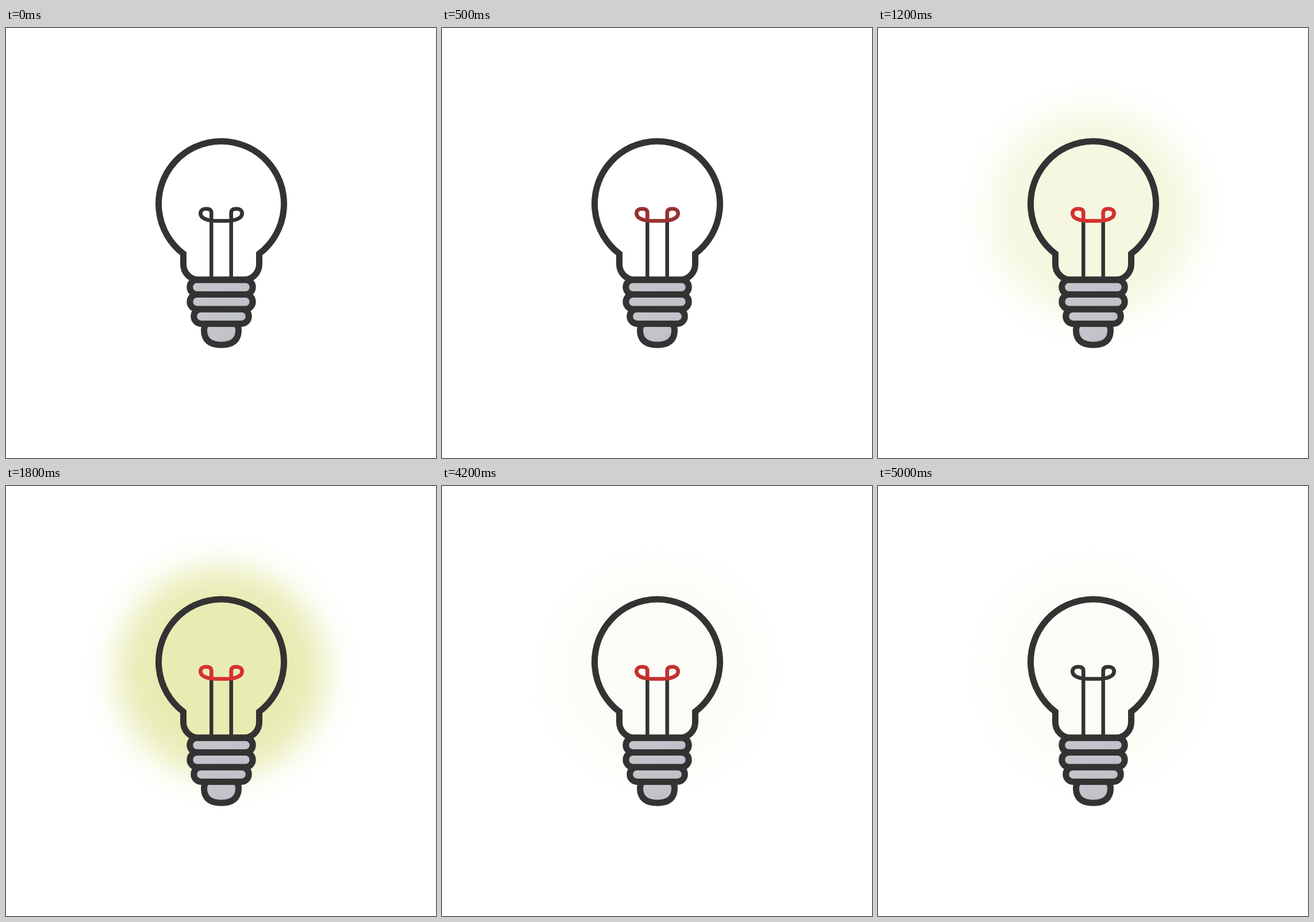
An HTML page for the animation above (5.1 s loop, 748 px wide and 748 px high).

```html
<!DOCTYPE html>
<html lang="en">
<head>
<meta charset="utf-8">
<title>Light bulb</title>
<style>
  html, body { margin: 0; width: 100%; height: 100%; overflow: hidden; background: #fff; }
  svg { display: block; width: 100vw; height: 100vh; }
</style>
</head>
<body>
<svg viewBox="0 0 748 748" fill="none" stroke="#333" stroke-width="11">
  <defs>
    <filter id="blur" x="-50%" y="-50%" width="200%" height="200%" color-interpolation-filters="sRGB">
      <feGaussianBlur stdDeviation="28"/>
    </filter>
    <linearGradient id="metal" x1="0" y1="0" x2="1" y2="1">
      <stop offset="0" stop-color="#c7c8cd"/>
      <stop offset="1" stop-color="#bdbfc7"/>
    </linearGradient>
  </defs>
  <g id="glow" opacity="0">
    <circle cx="374.5" cy="323" r="182" fill="#e8ecb3" stroke="none" filter="url(#blur)"/>
  </g>
  <path d="M357.3 335V438M391.7 335V438" stroke-width="6.5"/>
  <path id="filament" stroke-width="6.7" d="M357.3 337V321Q357 314.5 348 314.5C342 314.5 338.3 318 338.3 322.5
    C338.3 330 348 335.5 366 335.5H383C401 335.5 410.7 330 410.7 322.5C410.7 318 407 314.5 401 314.5Q392 314.5 391.7 321V337"/>
  <g fill="url(#metal)">
    <path d="M350 514Q344.5 518 344.5 526C344.5 543 355 551.3 374.5 551.3S404.5 543 404.5 526Q404.5 518 399 514Z"/>
    <rect x="326.7" y="489" width="95.6" height="25.4" rx="12.7"/>
    <rect x="319.8" y="463.5" width="109.4" height="25.5" rx="12.7"/>
    <rect x="319.8" y="438" width="109.4" height="25.5" rx="12.7"/>
  </g>
  <path d="M440.5 392.7A109 109 0 1 0 308.5 392.7V411A27 27 0 0 0 335.5 438H413.5A27 27 0 0 0 440.5 411Z"/>
</svg>
<script>
  const LOOP = 5100, STEP = 100, SWITCH_OFF = 3900;
  const COLD = [51, 51, 51], HOT = [249, 48, 48];
  const glow = document.getElementById('glow');
  const filament = document.getElementById('filament');
  const clamp = v => Math.max(0, Math.min(1, v));

  // The filament warms before the glow appears, then flares and cools at switch-off.
  const heatAt = t => t < SWITCH_OFF ? Math.min(t, 800) / 980 : clamp((5000 - t) / 1100);
  const glowAt = t => t < SWITCH_OFF ? clamp((t - 800) / 1000) : 0.11;

  function draw(time) {
    const t = Math.floor((time % LOOP) / STEP) * STEP;
    const heat = heatAt(t);
    const color = COLD.map((c, i) => Math.round(c + (HOT[i] - c) * heat));
    filament.setAttribute('stroke', `rgb(${color})`);
    glow.setAttribute('opacity', glowAt(t));
  }

  const start = performance.now();
  function tick() {
    draw(performance.now() - start);
    requestAnimationFrame(tick);
  }
  tick();
</script>
</body>
</html>
```
